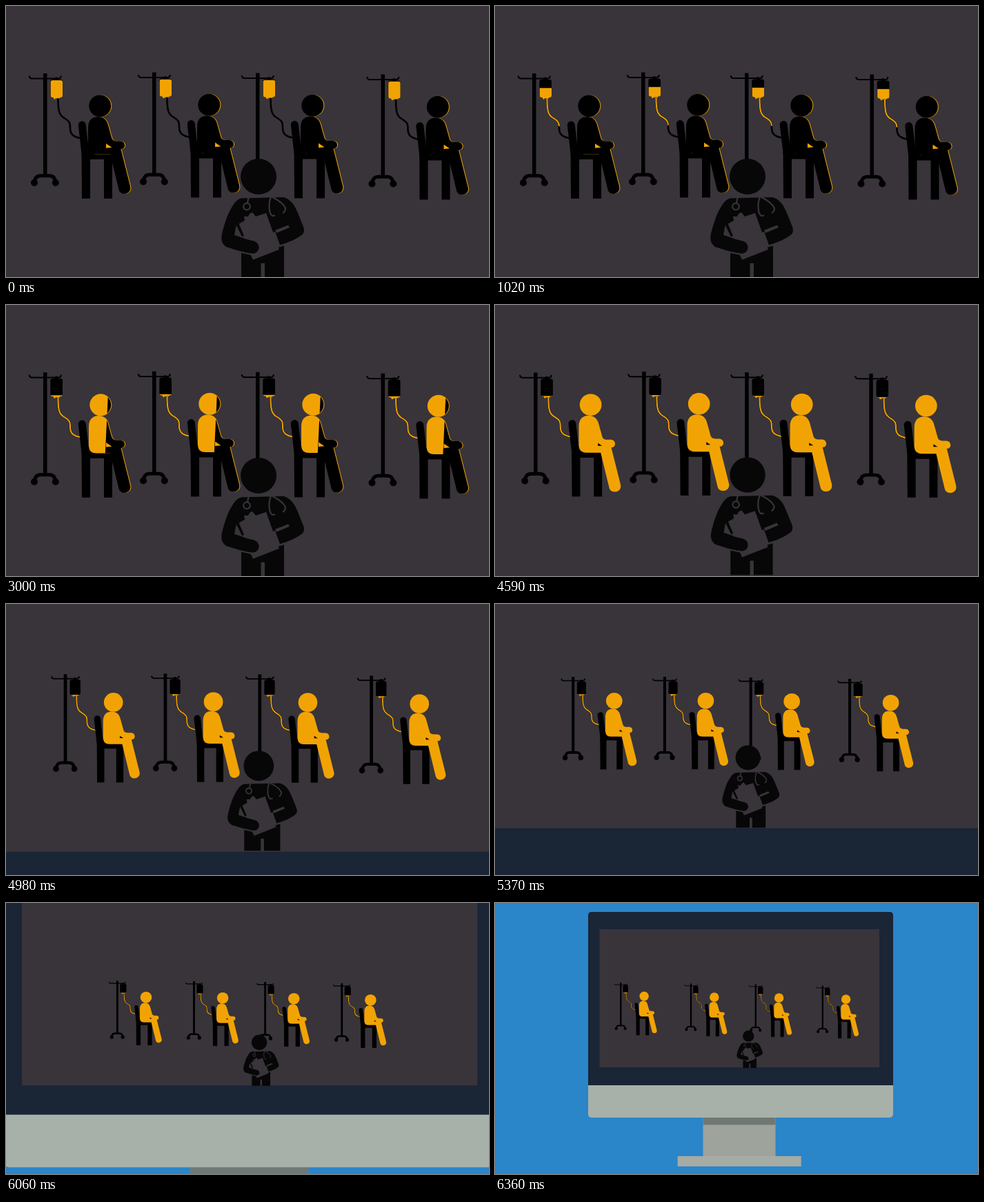
An HTML page that plays this animation: 700x394 px, repeating every 6.75 s.

```html
<!DOCTYPE html>
<html lang="en">
<head>
<meta charset="utf-8">
<title>Infusion ward</title>
<style>
  html, body { margin: 0; width: 100%; height: 100%; overflow: hidden; background: #2b85c9; }
  svg { display: block; width: 100vw; height: 100vh; }
  .gold { fill: #f2a304; }
  .line { fill: none; stroke: #000; }
  .gap { fill: none; stroke: #38343a; stroke-width: 2.2; }
</style>
</head>
<body>
<svg viewBox="0 0 700 394">
  <defs>
    <clipPath id="bagClip"><rect id="level" x="60" width="30" height="40"/></clipPath>
    <clipPath id="coverClip"><path id="wipe" d="M2,90 L-7.5,290 H400 V90Z"/></clipPath>
    <path id="tube" pathLength="1" d="M75.5,134 C75.5,152 77,158 83,162 C93,168 93,170 93,178 C93,188 99,192 118,193.5"/>
    <g id="body">
      <circle cx="137.3" cy="145.2" r="16"/>
      <path d="M120,177 C120,166 126,161 134,161 C142,161 147,165 149,173 L154,191 C155,195 157,196 161,196.5 H167 C175,197 175,208 167.5,208 L181,262 C184,274 167,277 164.5,267 L152,215.5 H131 C123,215.5 120,211 120,204Z"/>
    </g>
    <g id="patient">
      <!-- drip stand -->
      <rect x="54" y="98" width="5.5" height="148"/>
      <path class="line" stroke-width="2.2" d="M33.8,101.5 Q34,105.5 38,105.5 H76 Q79.6,105.5 79.8,101.5"/>
      <path class="line" stroke-width="5" d="M41,257 Q42,246.7 50,246.7 H63 Q71,246.7 71.8,257"/>
      <circle cx="41" cy="257" r="5"/>
      <circle cx="71.8" cy="257" r="5"/>
      <path d="M70,108 V105 Q73,102 76,105 V108Z"/>
      <rect x="64.3" y="107" width="17.7" height="25.5" rx="3"/>
      <rect class="gold" x="64.7" y="108" width="17.3" height="25" rx="3" clip-path="url(#bagClip)"/>
      <path class="gold" d="M68.5,132.5 H78 V134.3 H76.5 V136 H74.5 V134.3 H71.5 V135.6 H69.5Z"/>
      <use href="#tube" class="line" stroke-width="2.6"/>
      <use href="#tube" id="flow" fill="none" stroke="#f2a304" stroke-width="2" stroke-dasharray="1 2"/>
      <!-- chair -->
      <path class="line" stroke-width="11" stroke-linecap="round" d="M110.3,173 L115,214"/>
      <path d="M109.5,206 H154 V280 H142 V223 H122 V280 H110Z"/>
      <!-- sitter, with a dark cover that is wiped away -->
      <use href="#body" class="gold"/>
      <path d="M148,201.5 L154,205.5 H148Z"/>
      <g clip-path="url(#coverClip)">
        <use href="#body" x="-1"/>
        <path class="gold" d="M145,200 L153.5,205.8 L145,206.5Z"/>
      </g>
    </g>
  </defs>

  <rect width="700" height="394" fill="#2b85c9"/>
  <g id="monitor">
    <rect x="301.5" y="312" width="105" height="57" fill="#9ea39b"/>
    <rect x="301.5" y="311" width="105" height="11.5" fill="#707874"/>
    <rect x="264.7" y="368" width="179" height="15" fill="#a6aba3"/>
    <rect x="135" y="240" width="442" height="72" rx="5" fill="#a7b1a9"/>
    <path fill="#1a2536" d="M135,265 V18 Q135,13 140,13 H572 Q577,13 577,18 V265Z"/>
    <rect x="151.5" y="38" width="405.5" height="201" fill="#38343a"/>
  </g>

  <g id="ward"></g>

  <g id="doctor" fill="#070707">
    <circle cx="366" cy="248" r="26"/>
    <path d="M341,279.5 L402,278 C413,281 418,289 423,301 L431,321 C433,327 432,331 427,334 C417,341 408,344 397,347.5 L390,328 L348,345 L366,342 C370,350 366,359 357,360 C343,359 331,355 319,350 C313,346 311,340 313,331 C316,319 321,302 327,293 C331,286 335,281 341,279.5Z"/>
    <path d="M341,358 L357,362 L403,348.5 V395 H375 V374 H369.5 V395 H341Z"/>
    <path fill="#38343a" d="M334,317 L331,333 L346,338 L342,330Z"/>
    <path fill="#38343a" d="M390,326 L409,318.5 L411,322 L392,330Z"/>
    <path fill="#38343a" d="M337,317 L346,312 L345,306 L351,306 L353,302 L357,300 L362,306 L377,301 L396,354 L358,369 L353,358Z"/>
    <path d="M333,317 L337,315.5 L345,334 L342,335.5Z"/>
    <path d="M318,331 L356,341 C371,343 369,360 357,360 L319,350Z"/>
    <path class="gap" d="M321,352 Q338,358 357,361.5 M398,348.5 Q418,343 429,334.5"/>
    <circle class="gap" cx="349" cy="291.5" r="4.8"/>
    <path class="gap" d="M351.5,279 L350,286 M384,278 Q381,285 381.5,293 Q382,303 386,305 L390,304.5 M386,278 Q402,286 405,294 Q405,299 401,301"/>
  </g>
</svg>
<script>
const LOOP = 6750, STEP = 30;
const $ = id => document.getElementById(id);
const lerp = (a, b, p) => a + (b - a) * p;
const clamp = v => Math.min(1, Math.max(0, v));

// Moves a part so that its anchor lies at (x, y), scaled by s.
const place = (el, [ax, ay], x, y, s) =>
  el.setAttribute('transform', `translate(${x} ${y}) scale(${s}) translate(${-ax} ${-ay})`);

// Head positions before and after the zoom: x0, y0, x1, y1
const seats = [
  [137, 145, 216, 135.5],
  [295, 143.5, 317.7, 137],
  [445, 144.5, 411.5, 138],
  [626.5, 146.5, 508.5, 140],
].map(seat => {
  const el = document.createElementNS('http://www.w3.org/2000/svg', 'use');
  el.setAttribute('href', '#patient');
  $('ward').append(el);
  return { el, seat };
});

function draw(t) {
  const drain = 1 - (1 - clamp(t / 3840)) ** 2;
  $('level').setAttribute('y', lerp(108, 132.5, drain));

  const u = clamp(t / 2070);
  $('flow').setAttribute('stroke-dashoffset', 1 - u * (1.3 - 0.3 * u));

  $('wipe').setAttribute('transform', `translate(${119 + 0.064 * (t - 2550)})`);

  const p = clamp((t - 4560) / 1800);
  for (const { el, seat: [x0, y0, x1, y1] } of seats)
    place(el, [137, 145], lerp(x0, x1, p), lerp(y0, y1, p), lerp(1, 0.42, p));
  place($('doctor'), [366, 248], lerp(366, 367.3, p), lerp(248, 193.5, p), lerp(1, 0.315, p));
  place($('monitor'), [354.2, 239], lerp(347, 354.2, p), lerp(397, 239, p), lerp(4.77, 1, p));
}

const start = performance.now();
(function frame() {
  const t = (performance.now() - start) % LOOP;
  draw(Math.floor(t / STEP) * STEP);
  requestAnimationFrame(frame);
})();
</script>
</body>
</html>
```
